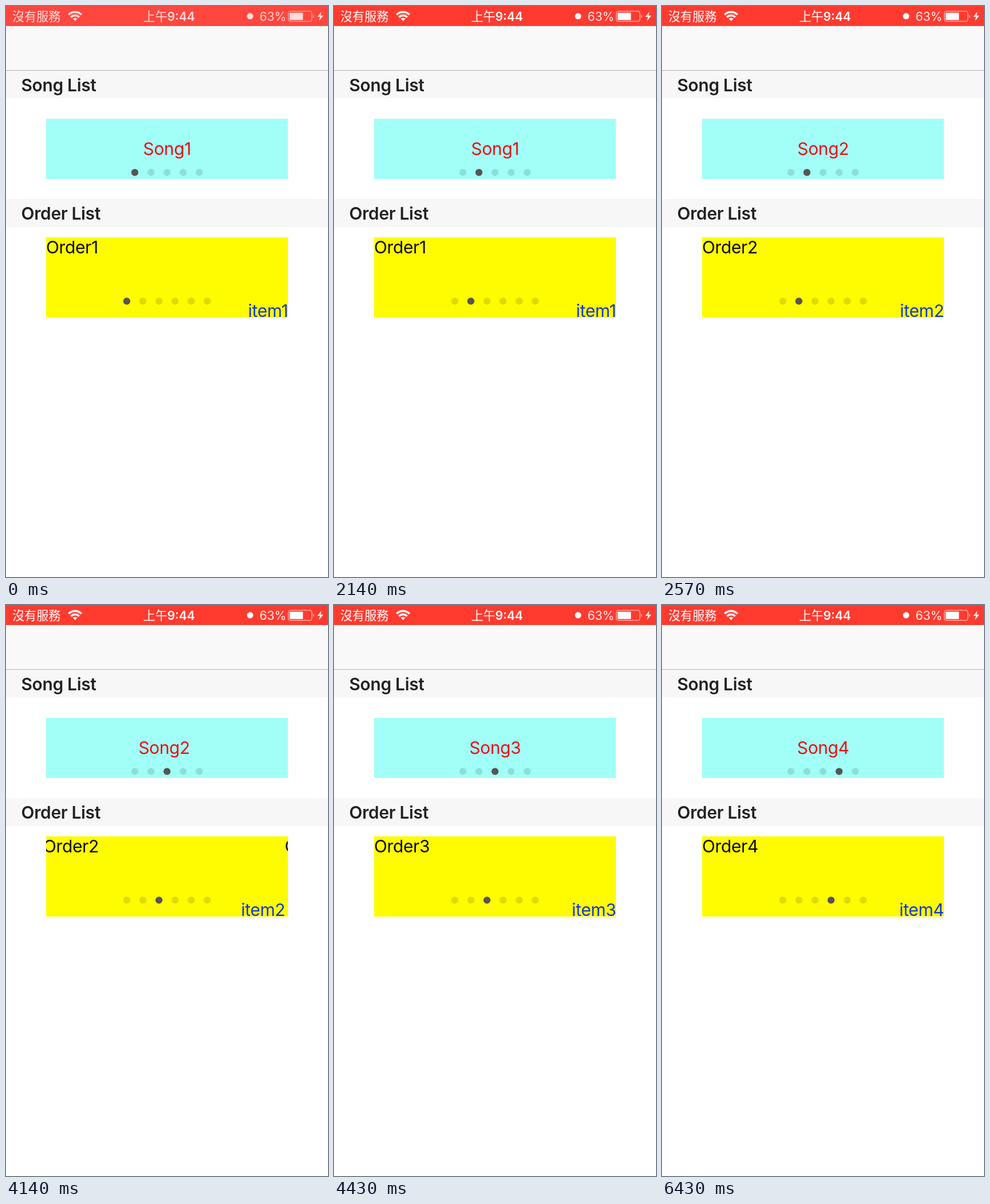
An HTML page for the animation above (8 s loop, 562x997 px).

```html
<!DOCTYPE html>
<html lang="zh-Hant">
<head>
<meta charset="utf-8">
<style>
  html, body { margin: 0; width: 100%; height: 100%; overflow: hidden; background: #fff; }
  svg { display: block; }
  text {
    font: 400 29.86px Inter, "Open Sans", sans-serif;
    font-optical-sizing: none;
    letter-spacing: -0.3px;
  }
  .head { font-weight: 600; fill: #222; }
  .song { fill: #ee0d12; text-anchor: middle; }
  .order { fill: #0a0a0a; }
  .item { fill: #1238d4; text-anchor: end; }
  .bar text { font-size: 21.07px; fill: #fff; letter-spacing: 0; }
  .bar .cjk { font-family: "Noto Sans CJK TC", "Noto Sans CJK", sans-serif; }
  .bar .light { font-weight: 300; }
  .bar .mid { font-weight: 500; }
  .bar .bold { font-weight: 600; }
</style>
</head>
<body>
<svg width="562" height="997" viewBox="0 0 562 997">
  <rect width="562" height="997" fill="#fff"/>
  <rect id="barBg" width="562" height="35" fill="#ff3b30"/>
  <g id="bar" class="bar">
    <text class="cjk light" x="11" y="26">沒有服務</text>
    <g fill="none" stroke="#fff" stroke-width="3.6">
      <path d="M109.3 15.2A15.8 15.8 0 0 1 131.7 15.2"/>
      <path d="M113.4 19.4A10 10 0 0 1 127.6 19.4"/>
    </g>
    <path d="M120.5 26.2L116.6 22.3A5.5 5.5 0 0 1 124.4 22.3Z" fill="#fff"/>
    <text class="cjk mid" x="239.5" y="25.8">上午</text>
    <text class="bold" x="281.5" y="25.7">9:44</text>
    <circle cx="426" cy="17.8" r="5.5" fill="#fff"/>
    <text x="442.5" y="25.7" fill-opacity=".9">63%</text>
    <rect x="492.8" y="9.3" width="41" height="17.4" rx="3.5" fill="none" stroke="#fff" stroke-opacity=".55" stroke-width="1.6"/>
    <path d="M535.8 15V21Q537.8 20 537.8 18T535.8 15Z" fill="#fff" fill-opacity=".55"/>
    <rect x="495" y="11.7" width="23.3" height="12.8" rx="1" fill="#fff"/>
    <path d="M550.6 10L543.2 19H548L546.2 26.2L553.8 16.8H549Z" fill="#fff"/>
  </g>

  <rect y="35" width="562" height="77" fill="#f9f9f9"/>
  <rect y="112" width="562" height="1" fill="#b2b2b2"/>
  <rect y="113" width="562" height="48" fill="#f7f7f7"/>
  <text class="head" x="26.5" y="148.5">Song List</text>
  <rect y="337" width="562" height="49" fill="#f7f7f7"/>
  <text class="head" x="26.5" y="373.3">Order List</text>

  <svg x="70" y="197" width="422" height="105" overflow="hidden">
    <rect width="422" height="105" fill="#a1fff8"/>
    <g id="songs"></g>
    <g id="songDots"></g>
  </svg>
  <svg x="70" y="404" width="422" height="140" overflow="hidden">
    <rect width="422" height="140" fill="#fffb00"/>
    <g id="orders"></g>
    <g id="orderDots"></g>
  </svg>
</svg>

<script>
const LOOP = 8000, PAGE = 421.5, SLIDE = 300;
// The screen refreshes only at these times.
const TICKS = [0, 140, 2140, 2290, 2430, 2570, 4140, 4290, 4430, 6140, 6290, 6430];
const TURNS = [2140, 4140, 6140];
const STARTS = [2145, 4119, 6119];

const $ = id => document.getElementById(id);

function add(parent, tag, attrs, text) {
  const el = document.createElementNS('http://www.w3.org/2000/svg', tag);
  for (const key in attrs) el.setAttribute(key, attrs[key]);
  if (text) el.textContent = text;
  parent.appendChild(el);
  return el;
}

function makeDots(parent, count, y) {
  return Array.from({ length: count }, (_, i) =>
    add(parent, 'circle', { cx: 211 + (i - (count - 1) / 2) * 28.1, cy: y, r: 6.15 }));
}

for (let i = 0; i < 4; i++) {
  const x = i * PAGE, n = i + 1;
  add($('songs'), 'text', { class: 'song', x: x + 211.2, y: 63 }, 'Song' + n);
  add($('orders'), 'text', { class: 'order', x: x, y: 28.2 }, 'Order' + n);
  add($('orders'), 'text', { class: 'item', x: x + 422.3, y: 139.4 }, 'item' + n);
}
const pagers = [makeDots($('songDots'), 5, 93.6), makeDots($('orderDots'), 6, 111.3)];

function ease(u) {
  u = Math.min(1, Math.max(0, u));
  return (1 - Math.cos(Math.PI * u)) / 2;
}

function draw(now) {
  const time = now % LOOP;
  const t = TICKS.filter(k => k <= time).pop();
  const offset = PAGE * STARTS.reduce((sum, s) => sum + ease((t - s) / SLIDE), 0);
  const active = TURNS.filter(k => k <= t).length;

  for (const id of ['songs', 'orders'])
    $(id).setAttribute('transform', `translate(${-offset} 0)`);
  for (const dots of pagers)
    dots.forEach((dot, i) => {
      dot.setAttribute('fill', i === active ? '#555' : '#000');
      dot.setAttribute('fill-opacity', i === active ? 1 : 0.125);
    });

  const dim = t < 140;
  $('barBg').setAttribute('fill', dim ? '#ff473f' : '#ff3b30');
  $('bar').setAttribute('opacity', dim ? 0.82 : 1);
}

const begin = performance.now();
function loop() {
  draw(performance.now() - begin);
  requestAnimationFrame(loop);
}
draw(0);
requestAnimationFrame(loop);
</script>
</body>
</html>
```
